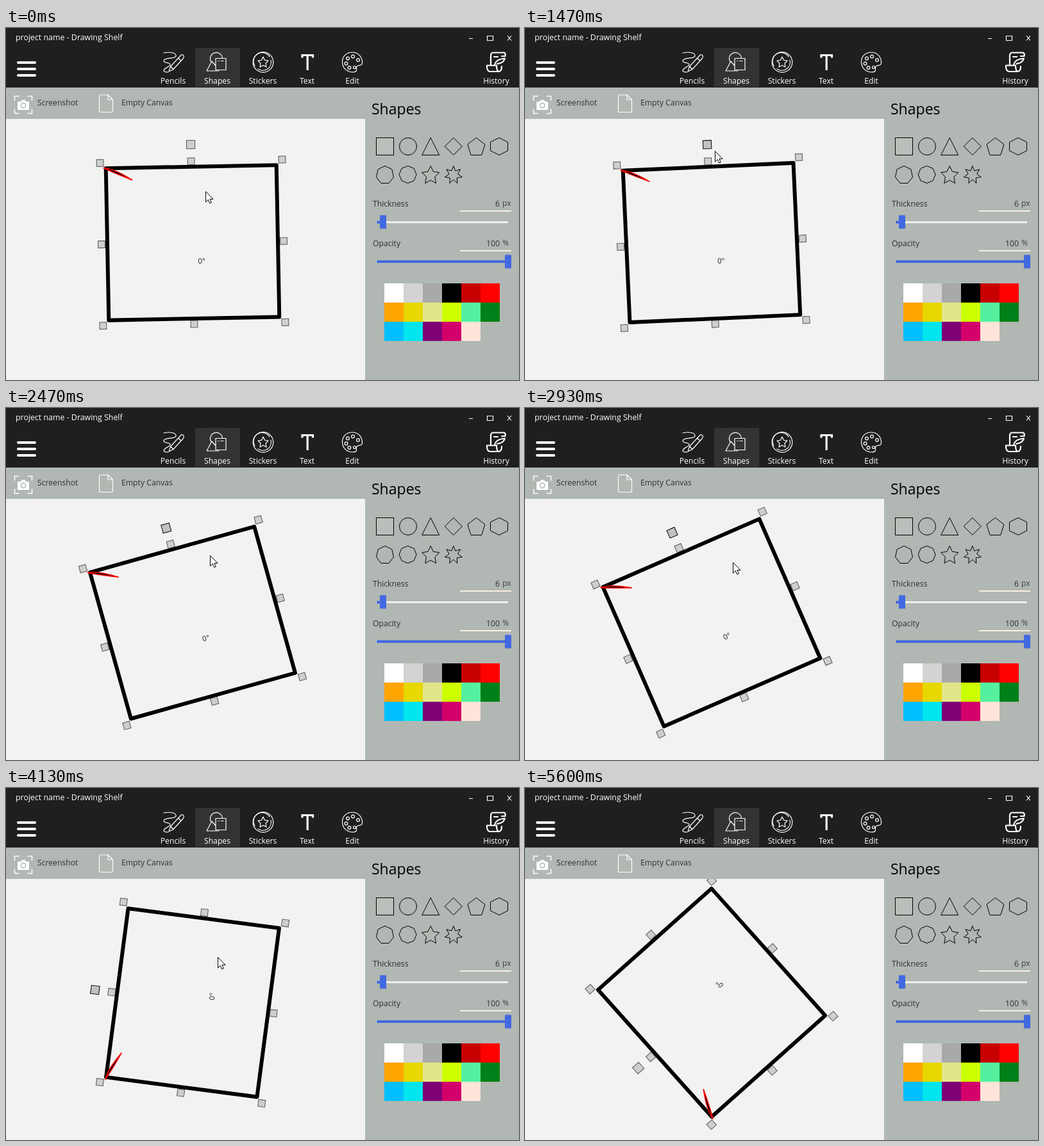
Write an HTML page that moves like this. It is 800 px wide and 550 px high and loops after 6390 ms.

```html
<!DOCTYPE html>
<html lang="en">
<head>
<meta charset="utf-8">
<title>Drawing Shelf</title>
<style>
  html, body { margin: 0; width: 100%; height: 100%; overflow: hidden; background: #b1b7b2; }
  svg { display: block; width: 800px; height: 550px; font: 12.2px "Open Sans", "Noto Sans", sans-serif; }
  .line { fill: none; stroke: #fff; stroke-width: 1.2; stroke-linejoin: round; stroke-linecap: round; }
  .butt { stroke-linecap: butt; stroke-linejoin: miter; }
  .tabs text { fill: #fff; text-anchor: middle; }
  .dark { fill: #2d3038; }
  .end { text-anchor: end; }
  #shapes { fill: none; stroke: #000; stroke-width: 1; }
  .grip { fill: rgba(196, 196, 196, .8); stroke: #555; stroke-width: 1; }
  .grip.hot { fill: #c0c0c0; stroke: #000; }
</style>
</head>
<body>
<svg viewBox="0 0 800 550">
  <clipPath id="page"><rect y="142" width="560" height="408"/></clipPath>
  <rect width="800" height="550" fill="#b1b7b2"/>
  <rect y="142" width="560" height="408" fill="#f2f2f1"/>

  <g clip-path="url(#page)">
    <g id="box">
      <rect x="-133" y="-118.700" width="266" height="237.400" fill="none" stroke="#000" stroke-width="6" stroke-linejoin="round"/>
      <path d="M-137-119.500Q-120-118-92-99.500Q-118-110-137-119.500Z" stroke="#f00" stroke-width="1.500"/>
      <text x="13.500" y="33" text-anchor="middle" font-size="11.500" fill="#222">0°</text>
      <g id="grips"></g>
    </g>
    <path id="cursor" d="M.5.5V17L4.300 13.400L6.800 19L9.300 17.900L6.900 12.400H12Z" fill="#fff" stroke="#000" stroke-width="1"/>
  </g>

  <rect width="800" height="93" fill="#1f1f1f"/>
  <rect x="295" y="31" width="70" height="61" fill="#333"/>
  <text x="15" y="19" font-size="12.400" fill="#fff">project name - Drawing Shelf</text>
  <path d="M722 16.500H728M750 12.500H760M750.500 12V19.500H759.500V12M782 12L788 19.500M788 12L782 19.500" class="line butt"/>
  <path d="M19 54H45M19 64H45M19 74H45" class="line" style="stroke-width:4"/>

  <g class="tabs">
    <text x="260.500" y="87">Pencils</text>
    <text x="329.500" y="87">Shapes</text>
    <text x="400.500" y="87">Stickers</text>
    <text x="469.500" y="87">Text</text>
    <text x="540" y="87">Edit</text>
    <text x="764.500" y="87">History</text>
  </g>

  <g class="line">
    <!-- pencil -->
    <path d="M246 39C254 37 266 38 265 44C263 49 248 45 246 51C246 56 256 53 256 57C256 61 246 62 246 67Q247 69 253 69"/>
    <path d="M254 68L256.500 60L272 43.500Q274 40 277 43Q278 46 275.500 48.500L261 64.500ZM256.500 60L261 64.500M268.500 47L273 51"/>
    <!-- shapes -->
    <path d="M320 53A9.500 9.500 0 1 1 337.500 47.500M327 47.500H343V65.500H327ZM327 59L321 52L313 67H332M331 51.500H332M335 51.500H339"/>
    <!-- sticker -->
    <circle cx="401" cy="53.500" r="15.800"/>
    <path d="M388 59A13 13 0 0 1 411 45M413 50A13 13 0 0 1 393 64"/>
    <path id="sticker"/>
    <!-- palette -->
    <path d="M540 38C550 38 556 46 555.500 55C555 60 550 57 547 60C544 63 551 68 541 69C531 69 524.500 62 524.500 53C524.500 44 531 38 540 38Z"/>
    <circle cx="530.500" cy="55.500" r="2.400"/><circle cx="535.500" cy="62" r="2.400"/>
    <circle cx="533" cy="47.500" r="2.400"/><circle cx="541" cy="44.500" r="2.400"/>
    <circle cx="549" cy="50" r="2.400"/><circle cx="543.500" cy="61.500" r="2"/>
  </g>
  <path d="M462 46.500V42.500H478.500V46.500M470.200 42.500V66" class="line butt" style="stroke-width:3.200"/>
  <path d="M756 57V43Q756 38.500 760 38.500H777Q779.500 40 778.500 44H773M750 58.500H765Q765 68 769 68H754Q749.500 66 750 58.500M769 68Q773 67 773 60M762 58Q763 49 778 47.500Q776 55 766 56M761 45H767" class="line" style="stroke-width:2.200"/>

  <!-- toolbar -->
  <path d="M13.500 113V106.500H20M34 106.500H40.500V113M40.500 127V133.500H34M20 133.500H13.500V127" class="line" style="stroke-width:1.500"/>
  <path d="M19 115H23L24.500 112.500H30L31.500 115H35Q36 115 36 116V127Q36 128 35 128H19Q18 128 18 127V116Q18 115 19 115Z" fill="#fff"/>
  <circle cx="27" cy="121" r="3.700" fill="#fff" stroke="#b1b7b2" stroke-width="1.500"/>
  <path d="M147 104.500H159L166.500 112V129.500Q166.500 131.500 164.500 131.500H147.500Q145.500 131.500 145.500 129.500V106.500Q145.500 104.500 147 104.500ZM159 104.500V112H166.500" class="line"/>
  <text x="49" y="121" class="dark">Screenshot</text>
  <text x="180" y="121" class="dark">Empty Canvas</text>

  <!-- side panel -->
  <text x="570" y="135" font-size="23">Shapes</text>
  <g id="shapes">
    <rect x="577.500" y="171.500" width="27" height="27" fill="#bbbfbb"/>
    <circle cx="627" cy="185" r="13.500"/>
  </g>
  <g class="dark">
    <text x="572" y="279">Thickness</text>
    <text x="770" y="279" class="end">6</text>
    <text x="774" y="278" fill="#444">px</text>
    <text x="572" y="341">Opacity</text>
    <text x="770" y="341" class="end">100</text>
    <text x="774" y="340" fill="#444">%</text>
  </g>
  <path d="M708 286H788M708 348H788" stroke="#f8f0df" stroke-width="2"/>
  <path d="M577 303.500H783M577 365H579" stroke="#eef0ee" stroke-width="3"/>
  <path d="M578 303.500H584M578 365H779" stroke="#4169e1" stroke-width="4"/>
  <rect x="583" y="292.500" width="10" height="21" rx="1" fill="#4169e1"/>
  <rect x="778" y="354.500" width="10" height="21" rx="1" fill="#4169e1"/>
  <g id="palette"></g>
</svg>

<script>
  const LOOP = 6390, FPS = 15;
  const $ = id => document.getElementById(id);

  function add(parent, tag, attrs) {
    const el = document.createElementNS("http://www.w3.org/2000/svg", tag);
    for (const key in attrs) el.setAttribute(key, attrs[key]);
    return $(parent).appendChild(el);
  }

  // Regular polygon or star, stretched to a square of the given size
  function polygon(cx, cy, n, inner = 0, size = 27) {
    const count = inner ? 2 * n : n;
    const pts = Array.from({ length: count }, (_, i) => {
      const a = i * 2 * Math.PI / count, r = inner && i % 2 ? inner : 1;
      return [r * Math.sin(a), -r * Math.cos(a)];
    });
    const fit = (axis, c) => {
      const v = pts.map(p => p[axis]), lo = Math.min(...v), hi = Math.max(...v);
      return v.map(x => (c + size * ((x - lo) / (hi - lo) - .5)).toFixed(2));
    };
    const xs = fit(0, cx), ys = fit(1, cy);
    return "M" + xs.map((x, i) => x + " " + ys[i]).join("L") + "Z";
  }

  // Six cells per row; the square and the circle fill the first two
  function shape(cell, sides, inner) {
    const x = 591 + cell % 6 * 35.6, y = cell < 6 ? 185 : 229;
    add("shapes", "path", { d: polygon(x, y, sides, inner) });
  }
  for (let n = 3; n <= 8; n++) shape(n - 1, n);
  shape(8, 5, .5);
  shape(9, 7, .5);
  $("sticker").setAttribute("d", polygon(401, 53, 5, .5, 16));

  ("#fff #d3d3d3 #a9a9a9 #000 #c80000 #f00 #ffa500 #e6d800 #e2e68a #cf0 #54f0a0 #008018 " +
   "#00bfff #00e5ee #800075 #d3006b #ffe4da").split(" ").forEach((fill, i) =>
    add("palette", "rect", { x: 590 + i % 6 * 30, y: 399 + Math.floor(i / 6) * 30, width: 30, height: 30, fill }));

  const grip = (x, y, s) =>
    add("grips", "rect", { class: "grip", x: x - s / 2, y: y - s / 2, width: s, height: s });
  for (const x of [-142, 0, 142])
    for (const y of [-127.2, 0, 127.2]) if (x || y) grip(x, y, 10.8);
  const knob = grip(0, -153.4, 13);

  // Progress from 0 to 1 between two times, eased by a power
  const ease = (t, from, to, power = 1) =>
    Math.min(1, Math.max(0, (t - from) / (to - from))) ** power;

  // Strokes of the drag: from, to, degrees added, easing power
  const REST = 1.1;
  const strokes = [
    [1130, 2070, 6.9, 1.5],
    [2070, 2730, 14, 1.2],
    [2870, 3330, 21, 1.3],
    [3730, 4130, 39.2, 1.8],
    [4130, 4600, 49.6, 1],
  ];
  const turned = t => strokes.reduce((sum, [from, to, by, power]) => sum + by * ease(t, from, to, power), 0);

  function pointer(t, turn) {
    const come = 1 - ease(t, 0, 530), leave = ease(t, 5130, 5530, 1.5);
    // While dragging, the pointer slides down and curls back as the box turns
    const slide = turn / (turn + 15);
    return [
      291 + 20 * come + 100 * come * (1 - come) + 56 * slide - .0013 * turn ** 2 + 138 * leave,
      183 + 72 * come + 96 * slide + 30 * leave,
    ].map(Math.round);
  }

  function draw(time) {
    const t = Math.floor((time % LOOP + 4) * FPS / 1000) * 1000 / FPS;
    const turn = turned(t), [x, y] = pointer(t, turn);
    $("box").setAttribute("transform", `translate(291 335.4) rotate(${-REST - turn})`);
    $("cursor").setAttribute("transform", `translate(${x} ${y})`);
    $("cursor").style.display = t < 5600 ? "" : "none";
    knob.classList.toggle("hot", t > 460 && t < 5260);
  }

  const start = performance.now();
  function tick() {
    draw(performance.now() - start);
    requestAnimationFrame(tick);
  }
  tick();
</script>
</body>
</html>
```
